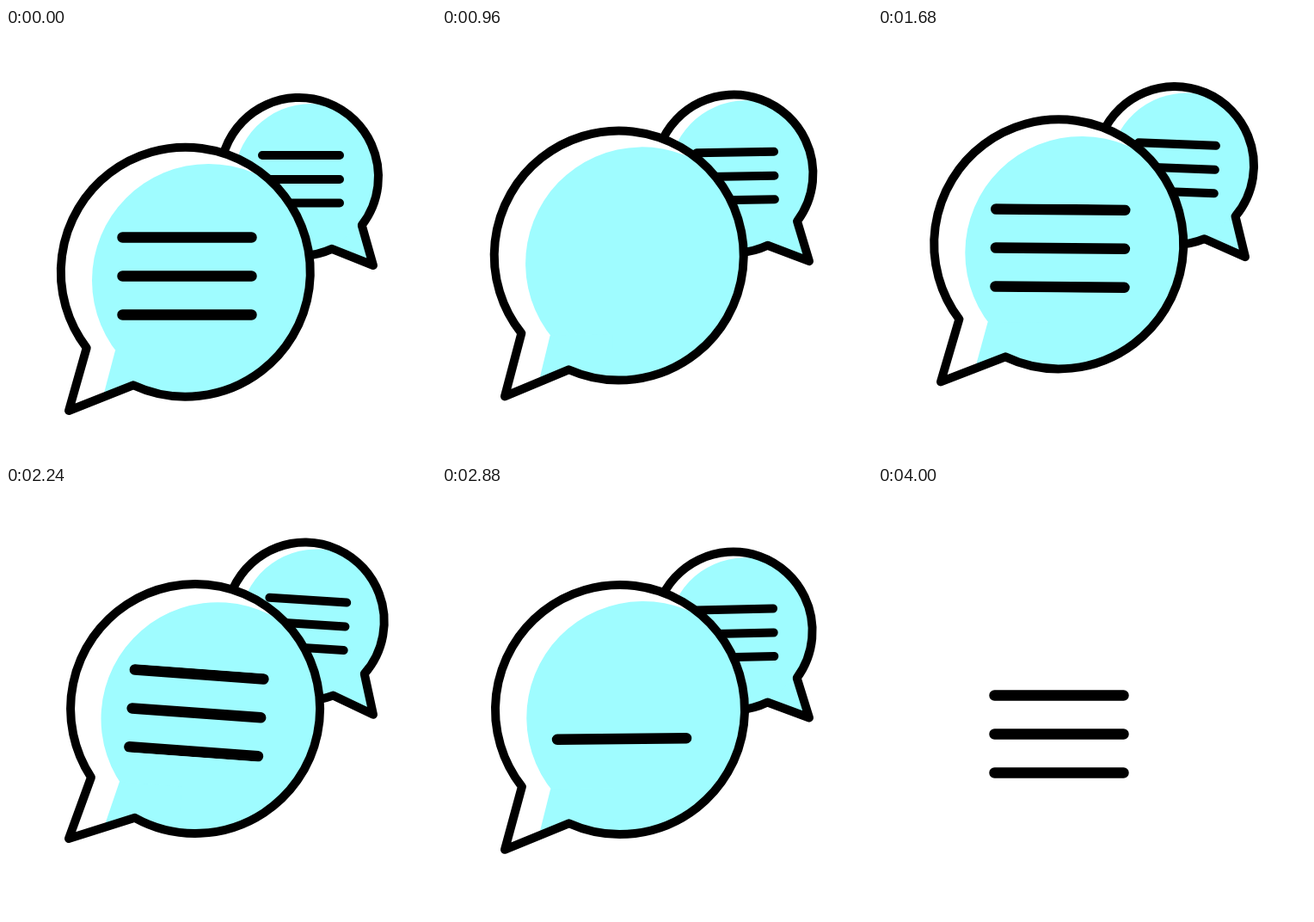
These frames come from a looping animation (500x500 px, 4.04 s). An HTML page with a canvas:

```html
<!DOCTYPE html>
<html lang="en">
<head>
<meta charset="utf-8">
<title>Chat bubbles</title>
<style>
  html, body { margin: 0; width: 100%; height: 100%; overflow: hidden; background: #fff; }
  canvas { display: block; width: 500px; height: 500px; }
</style>
</head>
<body>
<canvas id="stage" width="500" height="500"></canvas>
<script>
const ctx = document.getElementById('stage').getContext('2d');
const LOOP = 4040, STEP = 40, BODY_END = 4000;
const CYAN = '#9ffcff';

// Swing of the bubbles: [time in ms, degrees]
const SWING = [
  [0, 0], [680, 0], [1090, -1.4], [1480, 6], [1880, -5],
  [2260, 4.2], [2675, -2.9], [3090, 1.7], [3530, 0], [LOOP, 0]
];

// Tails run from the end of the round part over the tip to its start
const front = {
  x: 208.8, y: 283.7, r: 145, rise: 36, lag: 0,
  tail: [[95, 371], [73, 445], [148, 415]],
  shade: {
    x: 235.5, y: 293.5, r: 135.5,
    patch: [[127, 375], [112, 432], [200, 432], [200, 375]]
  },
  lines: { x1: 135.5, x2: 285.5, ys: [243.5, 288.5, 333.5], width: 12.5 }
};

const back = {
  x: 341, y: 173, r: 92, rise: 10.5, lag: 40,
  tail: [[379, 257], [427, 276], [412, 228]],
  shade: {
    x: 355, y: 178, r: 90,
    patch: [[379, 257], [427, 276], [412, 228]]
  },
  lines: { x1: 298, x2: 388, ys: [148, 176, 203.5], width: 10 }
};

const ease = u => (1 - Math.cos(Math.PI * Math.min(1, Math.max(0, u)))) / 2;

function swing(t) {
  if (t <= 0) return 0;
  const i = SWING.findIndex(k => k[0] > t);
  const [t0, a] = SWING[i - 1], [t1, b] = SWING[i];
  return a + (b - a) * ease((t - t0) / (t1 - t0));
}

// Front lines slip down behind their mask and return, twice per loop
function lineDrop(t) {
  const p = t % 2000;
  return 110 * (ease((p - 696) / 300) - ease((p - 1000) / 300));
}

function traceBubble({ x, y, r, tail: [end, tip, begin] }) {
  const angle = p => Math.atan2(p[1] - y, p[0] - x);
  ctx.beginPath();
  ctx.arc(x, y, r, angle(begin), angle(end), begin[0] > end[0] && end[0] > x);
  ctx.lineTo(...tip);
  ctx.closePath();
}

function drawShade({ x, y, r, patch }) {
  ctx.fillStyle = CYAN;
  ctx.beginPath();
  ctx.arc(x, y, r, 0, 2 * Math.PI);
  ctx.fill();
  ctx.beginPath();
  patch.forEach(p => ctx.lineTo(...p));
  ctx.fill();
}

function drawBody(b) {
  traceBubble(b);
  ctx.fillStyle = '#fff';
  ctx.fill();
  ctx.save();
  ctx.clip();
  drawShade(b.shade);
  ctx.restore();
  traceBubble(b);
  ctx.lineWidth = 10;
  ctx.stroke();
}

function drawLines({ x1, x2, ys, width }, drop) {
  ctx.save();
  ctx.beginPath();
  ctx.rect(x1 - 10, ys[0] - 6.5, x2 - x1 + 20, ys[2] - ys[0] + 13);
  ctx.clip();
  ctx.lineWidth = width;
  ctx.beginPath();
  for (const y of ys) {
    ctx.moveTo(x1, y + drop);
    ctx.lineTo(x2, y + drop);
  }
  ctx.stroke();
  ctx.restore();
}

// Each bubble floats up and swings about the tip of its tail
function drawBubble(b, t, drop, withBody) {
  const [px, py] = b.tail[1];
  const lift = b.rise * (1 - Math.cos(2 * Math.PI * t / LOOP)) / 2;
  ctx.save();
  ctx.translate(px, py - lift);
  ctx.rotate(swing(t - b.lag) * Math.PI / 180);
  ctx.translate(-px, -py);
  if (withBody) drawBody(b);
  drawLines(b.lines, drop);
  ctx.restore();
}

function draw(t) {
  ctx.fillStyle = '#fff';
  ctx.fillRect(0, 0, 500, 500);
  ctx.strokeStyle = '#000';
  ctx.lineCap = ctx.lineJoin = 'round';
  const withBody = t < BODY_END;
  if (withBody) drawBubble(back, t, 0, true);
  drawBubble(front, t, lineDrop(t), withBody);
}

// The round part always runs clockwise from the start of the tail
back.tail = [back.tail[0], back.tail[1], back.tail[2]];
traceBubble = ({ x, y, r, tail: [end, tip, begin] }) => {
  const angle = p => Math.atan2(p[1] - y, p[0] - x);
  const a = [angle(begin), angle(end)].sort((m, n) => m - n);
  const gapInside = a[1] - a[0] < Math.PI;
  ctx.beginPath();
  ctx.arc(x, y, r, gapInside ? a[1] : a[0], gapInside ? a[0] : a[1]);
  ctx.lineTo(...tip);
  ctx.closePath();
};

const start = performance.now();
function tick() {
  const t = (performance.now() - start) % LOOP;
  draw(Math.floor(t / STEP) * STEP);
  requestAnimationFrame(tick);
}
tick();
</script>
</body>
</html>
```
